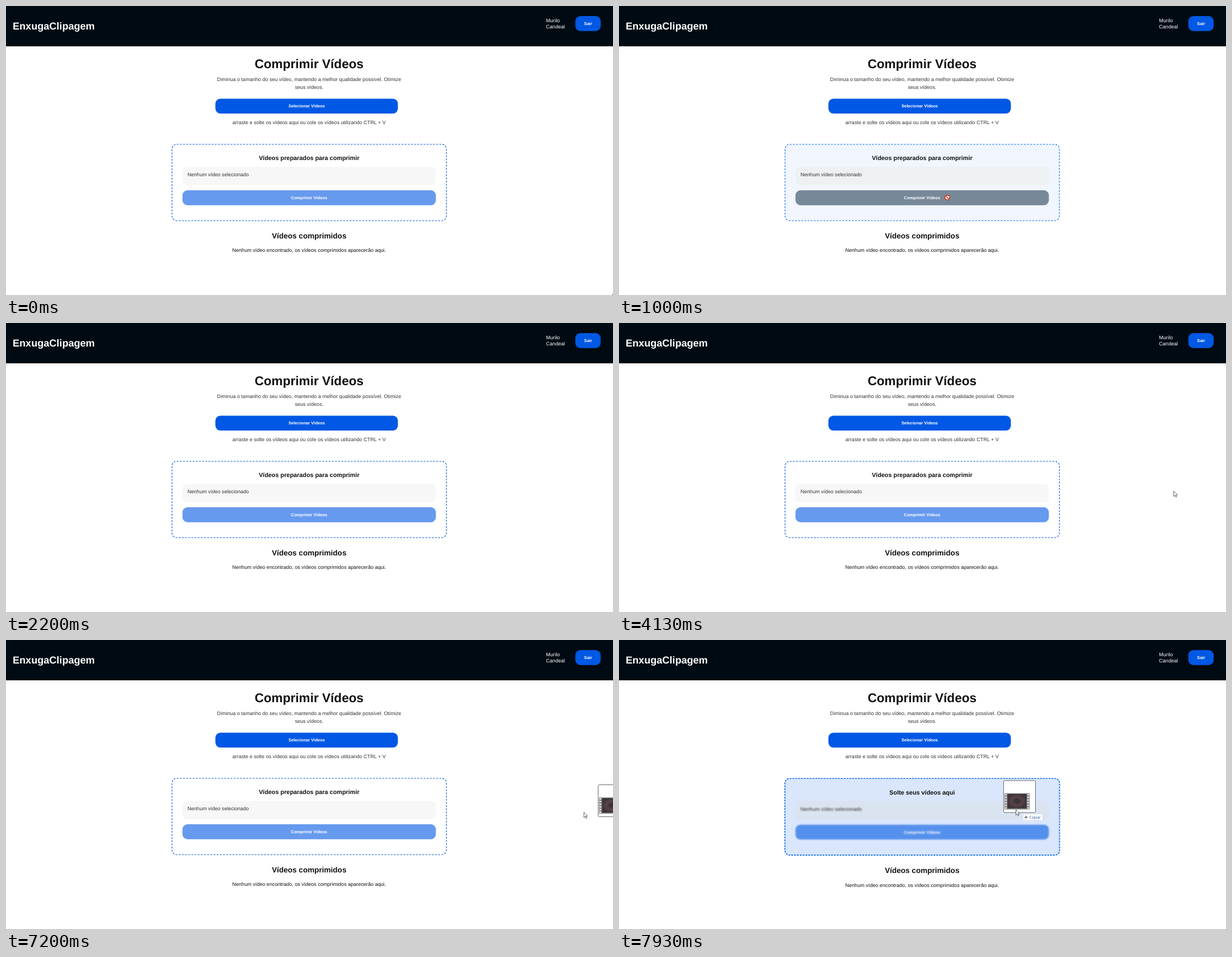
Write an HTML page that moves like this. It is 1085 px wide and 516 px high and loops after 8 s.

```html
<!DOCTYPE html>
<html lang="pt-BR">
<head>
<meta charset="utf-8">
<style>
  html, body { margin: 0; width: 100%; height: 100%; overflow: hidden; background: #fff; }
  svg { display: block; width: 1085px; height: 516px; }
  text { font: 9.06px "Liberation Sans", Arial, sans-serif; text-rendering: geometricPrecision; fill: #111; }
  .mid { text-anchor: middle; }
  .soft { fill: #333; }
  .light { fill: #fff; }
  .b { font-weight: bold; }
  .label { font-size: 7.56px; font-weight: bold; fill: #fff; text-anchor: middle; }
  .blue { fill: #0058e4; }
</style>
</head>
<body>
<svg viewBox="0 0 1085 516">
  <defs>
    <radialGradient id="photo">
      <stop offset=".2" stop-color="#3a3236"/>
      <stop offset=".6" stop-color="#5a434a"/>
      <stop offset="1" stop-color="#3b3438"/>
    </radialGradient>
    <pattern id="holes" width="5" height="4.8" patternUnits="userSpaceOnUse" x="2" y="23.2">
      <rect x=".8" y=".9" width="3.4" height="3" rx=".5" fill="#e2e2e2"/>
    </pattern>
  </defs>

  <rect width="1085" height="72" fill="#000a12"/>
  <text class="b light" x="12" y="42" style="font-size:18.08px">EnxugaClipagem</text>
  <text class="light" x="965.3" y="29.4">Murilo</text>
  <text class="light" x="965.3" y="39.6">Candeal</text>
  <rect class="blue" x="1017.6" y="18" width="45.4" height="26.7" rx="9"/>
  <text class="label" x="1040.5" y="34">Sair</text>

  <text class="mid b" x="541.8" y="110.6" style="font-size:22.6px">Comprimir Vídeos</text>
  <text class="mid soft" x="541.8" y="134.2">Diminua o tamanho do seu vídeo, mantendo a melhor qualidade possível. Otimize</text>
  <text class="mid soft" x="541.8" y="147.8">seus vídeos.</text>
  <rect class="blue" x="374.3" y="165.4" width="326.2" height="26.7" rx="9"/>
  <text class="label" x="537.5" y="181.3">Selecionar Vídeos</text>
  <text class="mid soft" x="541.8" y="210.7">arraste e solte os vídeos aqui ou cole os vídeos utilizando CTRL + V</text>

  <rect id="panel" rx="8.5"/>
  <g id="inside">
    <text id="title" class="mid b" x="541.8" y="275.2" style="font-size:10.87px"></text>
    <g id="content">
      <rect id="list" x="315.4" y="287.2" width="453" height="33" rx="8.5"/>
      <text class="soft" x="324.5" y="304.2">Nenhum vídeo selecionado</text>
      <rect id="button" x="315.4" y="329.1" width="453" height="26.6" rx="9"/>
      <text class="label" x="541.8" y="345.1">Comprimir Vídeos</text>
    </g>
  </g>
  <g id="below">
    <text class="mid b" x="541.8" y="414.5" style="font-size:13.56px">Vídeos comprimidos</text>
    <text class="mid" x="541.8" y="439.4">Nenhum vídeo encontrado, os vídeos comprimidos aparecerão aqui.</text>
  </g>

  <g id="ghost">
    <rect x=".5" y=".5" width="57" height="57" rx="2" fill="#fff" stroke="#66676b"/>
    <rect x="2" y="23.2" width="45" height="28.8" fill="#77787b"/>
    <rect x="2" y="23.2" width="5" height="28.8" fill="url(#holes)"/>
    <rect x="42" y="23.2" width="5" height="28.8" fill="url(#holes)" transform="translate(0 0)"/>
    <rect x="7.5" y="24.5" width="34" height="25.5" fill="url(#photo)"/>
    <g transform="translate(35 60.3)">
      <rect x=".3" y=".3" width="34.6" height="10.6" rx="1" fill="#fff" stroke="#ddd" stroke-width=".6"/>
      <path d="M2.8 5.6h5.6M5.6 2.8v5.6" stroke="#333" stroke-width=".9"/>
      <text x="11.3" y="8" style="font:6.7px 'Open Sans',sans-serif;fill:#1c3f9f">Copiar</text>
    </g>
  </g>
  <path id="arrow" d="M0 0V9.6L2.2 7.5L3.8 11L5.3 10.3L3.8 7H6.7Z" fill="#fff" stroke="#222" stroke-width=".7"/>
  <g id="denied" fill="none" stroke="#cf3a20" stroke-width="1.6">
    <circle r="4.1" fill="#fff"/>
    <path d="M-3 -3L3 3"/>
  </g>
</svg>
<script>
const $ = id => document.getElementById(id);
const LOOP = 8000, FPS = 15;
const EASE = 1.63;  // strength of the slowdown at the end of a hand movement
const UNIT = 0.565; // one page pixel on the stage

const ramp = (t, start, length) => Math.min(1, Math.max(0, (t - start) / length));
const pulse = (t, on, off) => ramp(t, on, 120) - ramp(t, off, 120);
const mix = (from, to, k) => `color-mix(in srgb, ${to} ${k * 100}%, ${from})`;

// Horizontal movement slows down, vertical movement is even.
function glide(t, start, end, [x0, y0], [x1, y1], power = EASE) {
  const u = ramp(t, start, end - start);
  return [x0 + (x1 - x0) * (1 - (1 - u) ** power), y0 + (y1 - y0) * u];
}

function pointerAt(t) {
  const rest = [587, 342], left = [336, 302];
  if (t < 1260) return glide(t, 340, 950, [1084, 514.5], rest);
  if (t < 1460) return glide(t, 1260, 1460, rest, [670, 540], 1);
  if (t > 2060 && t < 2190) return glide(t, 2066, 2134, [731, 433], [1006, 232], 1);
  if (t > 4130 && t < 4990) return glide(t, 4133, 4933, [992, 300], left);
  if (t > 4990 && t < 5260) return glide(t, 5000, 5200, left, [1007, 270], 1);
  if (t > 7190) return glide(t, 7200, 7933, [1033, 307.5], [709.5, 303]);
  return null;
}

function place(id, point) {
  $(id).style.display = point ? "" : "none";
  if (point) $(id).setAttribute("transform", `translate(${point})`);
}

function drawPanel(borderPixels, fill, stroke) {
  const panel = $("panel"), line = borderPixels * UNIT;
  const grow = (borderPixels - 2) * UNIT;
  const set = attrs => Object.entries(attrs).forEach(([name, value]) => panel.setAttribute(name, value));
  set({
    x: 296.2 - grow + line / 2, y: 246.4 + line / 2,
    width: 491.6 + 2 * grow - line, height: 137.4 + 2 * grow - line,
    "stroke-width": line
  });
  // Fit a whole number of dashes around the border.
  const dash = 6 * UNIT, period = borderPixels > 2 ? 9 * UNIT : 10 * UNIT;
  const length = panel.getTotalLength();
  set({ "stroke-dasharray": [dash, length / Math.round(length / period) - dash] });
  panel.style.fill = fill;
  panel.style.stroke = stroke;
}

function draw(t) {
  const drop = t > 7640;
  const k = drop ? ramp(t, 7600, 150) : pulse(t, 800, 1320) + pulse(t, 4290, 4780);
  const pressed = drop ? k : pulse(t, 880, 1290);
  const shift = drop ? UNIT : 0;

  drawPanel(drop ? 3 : 2, mix("#fff", drop ? "#d9e6fb" : "#f1f6fe", k), mix("#0055dd", "#0d6bf5", k));
  $("list").style.fill = mix("#f7f7f7", drop ? "#dae4f1" : "#edf1f3", k);
  $("button").style.fill = mix("#669aee", drop ? "#5591ec" : "#778899", pressed);
  $("title").textContent = drop ? "Solte seus vídeos aqui" : "Vídeos preparados para comprimir";
  $("content").style.filter = drop ? "blur(.9px)" : "none";
  place("inside", [0, shift]);
  place("below", [0, 2 * shift]);

  const pointer = pointerAt(t);
  const onButton = t < 1460 && pointer[1] > 329 && pointer[1] < 356;
  place("arrow", onButton ? null : pointer);
  place("denied", onButton ? pointer : null);
  place("ghost", t > 7190 ? glide(t, 7200, 7933, [1058, 258], [687, 250.5]) : null);
}

function tick(now) {
  const step = Math.floor((now % LOOP + 4) * FPS / 1000);
  draw(step * 1000 / FPS % LOOP);
  requestAnimationFrame(tick);
}
draw(0);
requestAnimationFrame(tick);
</script>
</body>
</html>
```
